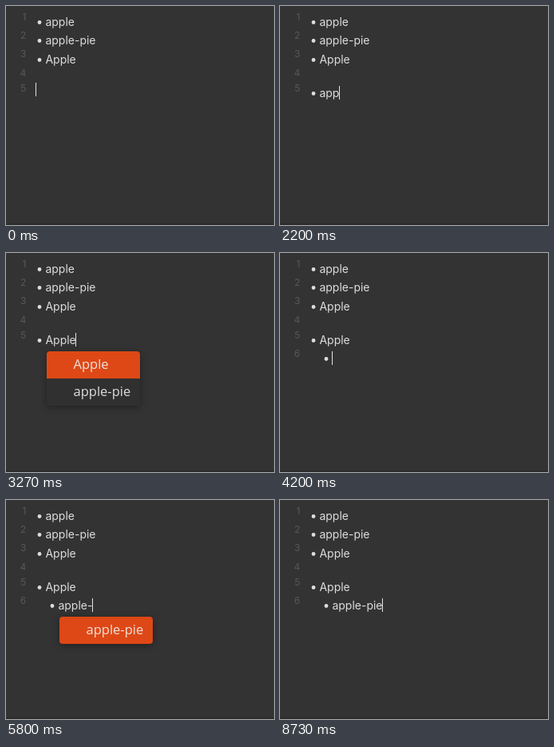
Animation, 336 px wide and 274 px high, one loop 9140 ms. Source, as an HTML page with a canvas:

```html
<!DOCTYPE html>
<html lang="en">
<head>
<meta charset="utf-8">
<title>List autocomplete</title>
<style>
  html, body { margin: 0; width: 100%; height: 100%; overflow: hidden; background: #333; }
  canvas { display: block; }
</style>
</head>
<body>
<canvas id="stage" width="336" height="274"></canvas>
<script>
const ctx = document.getElementById('stage').getContext('2d');
const LOOP = 9140;
const TEXT_X = 49.4, INDENT = 16, ROW = 34;
const EDITOR_FONT = '14px Inter, sans-serif';
const MENU_FONT = '16.5px "Open Sans", sans-serif';

// Each list holds [start time, value] pairs; the last one reached applies.
const typedFirst = [[0, ''], [930, '-'], [1600, ''], [1870, 'a'], [2000, 'ap'], [2200, 'app'],
  [2670, 'appl'], [2800, 'apple'], [3270, 'Apple']];
const typedSecond = [[3800, ''], [4470, 'a'], [4730, 'ap'], [4870, 'app'], [5270, 'appl'],
  [5400, 'apple'], [5670, 'apple-'], [5870, 'apple-p'], [6070, 'apple-pi'], [6270, 'apple-pie']];
const menus = [[0, []], [2330, ['apple', 'Apple', 'apple-pie']], [2870, ['Apple', 'apple-pie']], [3330, []],
  [4930, ['apple', 'Apple', 'apple-pie']], [5470, ['Apple', 'apple-pie']], [5730, ['apple-pie']], [6330, []]];
const carets = [[0, true], [530, false], [930, true], [6930, false], [7530, true], [8130, false], [8730, true]];

function at(track, t) {
  let value;
  for (const [start, v] of track) if (t >= start) value = v;
  return value;
}

function write(text, x, y, font, color, align = 'left') {
  ctx.font = font;
  ctx.fillStyle = color;
  ctx.textAlign = align;
  ctx.fillText(text, x, y);
}

function editorText(text, x, y) {
  write(text, x, y, EDITOR_FONT, '#dcddde');
  return x + ctx.measureText(text).width;
}

function listItem(text, y, indent = 0) {
  ctx.fillStyle = '#dcddde';
  ctx.beginPath();
  ctx.arc(42 + indent, y - 4.5, 2.4, 0, Math.PI * 2);
  ctx.fill();
  return editorText(text, TEXT_X + indent, y);
}

function box(x, y, w, h, radii, color) {
  ctx.fillStyle = color;
  ctx.beginPath();
  ctx.roundRect(x, y, w, h, radii);
  ctx.fill();
}

function menu(items, x, y) {
  ctx.save();
  ctx.shadowColor = 'rgba(0, 0, 0, 0.35)';
  ctx.shadowBlur = 10;
  ctx.shadowOffsetY = 2;
  box(x, y, 117, items.length * ROW, 4, '#303030');
  ctx.restore();
  box(x, y, 117, ROW, items.length > 1 ? [4, 4, 0, 0] : 4, '#de4816');
  items.forEach((item, i) => write(item, x + 33.5, y + i * ROW + 22, MENU_FONT, i ? '#dcddde' : '#f0e2dc'));
}

function draw(t) {
  const second = t >= 3800;
  ctx.fillStyle = '#333';
  ctx.fillRect(0, 0, 336, 274);
  ctx.fillStyle = '#2d2b2b';
  ctx.fillRect(0, 272, 336, 2);

  [18, 41, 64, 88, 107, 130].slice(0, second ? 6 : 5).forEach((y, i) =>
    write(i + 1, 25.3, y, '12px Inter, sans-serif', '#585858', 'right'));
  ['apple', 'apple-pie', 'Apple'].forEach((word, i) => listItem(word, [25, 48, 72][i]));

  const first = at(typedFirst, t);
  let y = t < 1600 ? 110 : 114;
  let caretX = t < 1600 ? editorText(first, 37.6, y) : listItem(first, y);
  const indent = t >= 4200 ? INDENT : 0;
  if (second) {
    y = 137;
    caretX = listItem(at(typedSecond, t), y, indent);
  }
  if (at(carets, t)) {
    ctx.fillStyle = '#e4e4e4';
    ctx.fillRect(Math.floor(caretX), y - 14, 1, 17);
  }

  const items = at(menus, t);
  if (items.length) menu(items, 51 + indent, y + 9);
}

function tick() {
  draw(performance.now() % LOOP);
  requestAnimationFrame(tick);
}
tick();
</script>
</body>
</html>
```
